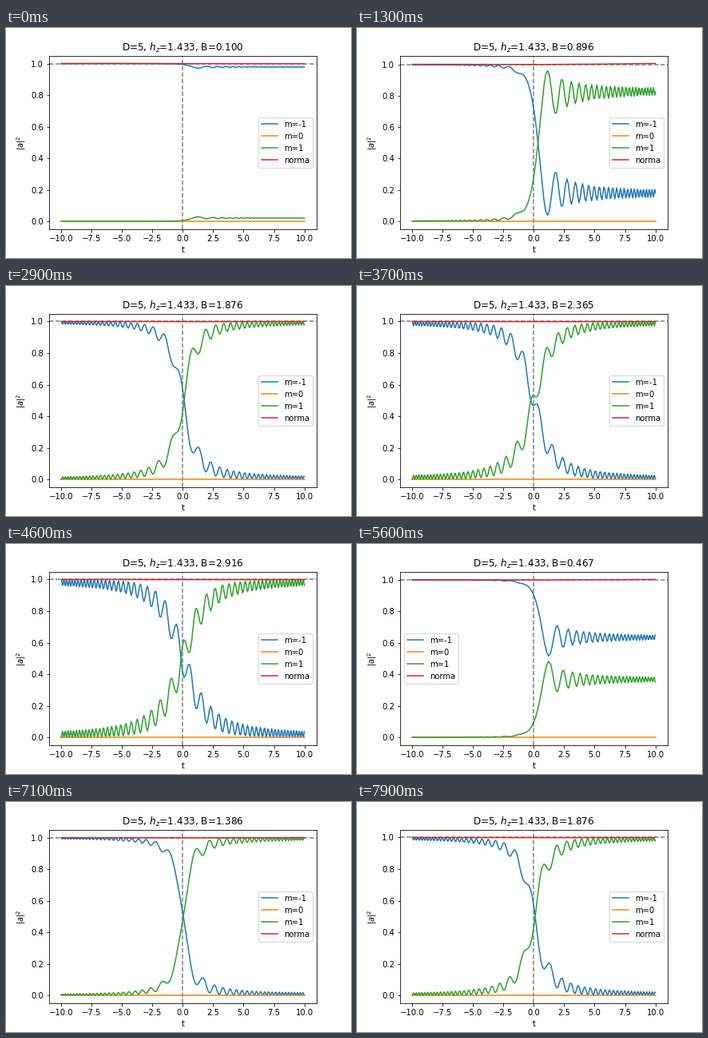
Animation, 432 px wide and 288 px high, one loop 8000 ms. Source, as a matplotlib script:

```python
import matplotlib.pyplot as plt
import numpy as np
from matplotlib.animation import FuncAnimation

D, HZ = 5, 1.433
T0, T1 = -10.0, 10.0
RTOL, ATOL = 1e-3, 1e-6
FIELDS = np.linspace(0.1, 3.1, 50)
FRAMES = 80

# Dormand-Prince 5(4) tableau
C = [0, 1/5, 3/10, 4/5, 8/9, 1]
A = [np.array(row) for row in (
    [],
    [1/5],
    [3/40, 9/40],
    [44/45, -56/15, 32/9],
    [19372/6561, -25360/2187, 64448/6561, -212/729],
    [9017/3168, -355/33, 46732/5247, 49/176, -5103/18656],
)]
W = np.array([35/384, 0, 500/1113, 125/192, -2187/6784, 11/84])
E = np.array([-71/57600, 0, 71/16695, -71/1920, 17253/339200, -22/525, 1/40])

SZ = np.diag([-1.0, 0.0, 1.0])
FLIP = np.fliplr(np.diag([1.0, 0.0, 1.0]))  # Sx^2 - Sy^2


def rms(v):
    return np.linalg.norm(v) / np.sqrt(v.size)


def first_step(rhs, y, f):
    scale = ATOL + np.abs(y) * RTOL
    d0, d1 = rms(y / scale), rms(f / scale)
    h = 0.01 * d0 / d1
    d2 = rms((rhs(T0 + h, y + h * f) - f) / scale) / h
    return min(100 * h, (0.01 / max(d1, d2)) ** 0.2)


def evolve(b):
    """Spin-1 sweep from m=-1; returns times and level populations."""
    static = -1j * (D * SZ @ SZ + b * FLIP)
    sweep = -1j * HZ * SZ

    def rhs(t, y):
        return (static + t * sweep) @ y

    t, y = T0, np.array([1, 0, 0], complex)
    f = rhs(t, y)
    h = first_step(rhs, y, f)
    k = np.empty((7, 3), complex)
    times, states = [t], [y]
    while t < T1:
        rejected = False
        while True:
            t_new = min(t + h, T1)
            h = t_new - t
            k[0] = f
            for s in range(1, 6):
                k[s] = rhs(t + C[s] * h, y + h * (A[s] @ k[:s]))
            y_new = y + h * (W @ k[:6])
            k[6] = rhs(t_new, y_new)
            scale = ATOL + np.maximum(np.abs(y), np.abs(y_new)) * RTOL
            err = max(rms(h * (E @ k) / scale), 1e-12)
            factor = 0.9 * err ** -0.2
            if err < 1:
                h *= min(1 if rejected else 10, factor)
                break
            h *= max(0.2, factor)
            rejected = True
        t, y, f = t_new, y_new, k[6].copy()
        times.append(t)
        states.append(y)
    return np.array(times), np.abs(np.array(states)) ** 2


runs = [evolve(b) for b in FIELDS]

fig, ax = plt.subplots(figsize=(6, 4), dpi=72)
fig.subplots_adjust(bottom=0.125)


def draw(i):
    n = i % len(FIELDS)
    t, pop = runs[n]
    ax.clear()
    ax.axhline(1, color="gray", ls="--")
    ax.axvline(0, color="gray", ls="--")
    for m in (-1, 0, 1):
        ax.plot(t, pop[:, m + 1], color=f"C{m + 1}", label=f"m={m}")
    ax.plot(t, pop.sum(axis=1), color="C3", label="norma")
    ax.set_title(f"D={D}, $h_z$={HZ}, B={FIELDS[n]:.3f}")
    ax.set_xlabel("t")
    ax.set_ylabel("$|a|^2$")
    ax.legend(loc="best")
    return ax.lines


anim = FuncAnimation(fig, draw, frames=FRAMES, interval=100,
                     repeat=True, repeat_delay=0, blit=False)
plt.show()
```
